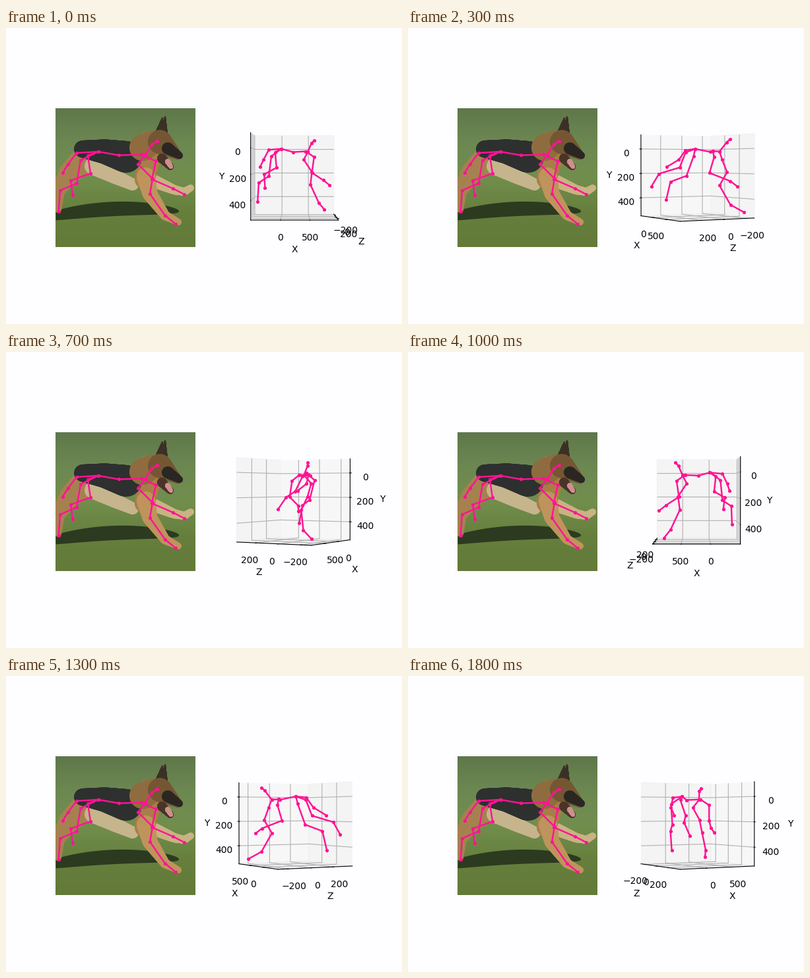
Animation of 600 by 450 pixels, one loop 2000 ms. Source, as a matplotlib script:

```python
import numpy as np
import matplotlib.pyplot as plt
from matplotlib.animation import FuncAnimation
from matplotlib.collections import PatchCollection
from matplotlib.colors import LinearSegmentedColormap
from matplotlib.patches import Circle

W, H, DPI = 600, 450, 100
FRAMES, INTERVAL = 20, 100
VIEWS = 12
PAPER, PINK = "#fefdff", "#ff1493"

# Key joints: position in the photo (u, v) and depth z.
HIP, NECK, WITHERS = (140, 188, 0), (211, 193, -99), (205, 192.4, -46)
CHAINS = [
    [HIP, (171, 193.5, -89), WITHERS, NECK, (221, 177, -147), (229, 172, -162)],
    [HIP, (107, 190, 35), (94, 207, 75), (86, 220, 175)],
    [HIP, (124, 194, 62), (128, 221, 125), (98, 232, 265), (101, 254, 338)],
    [HIP, (113, 201, -31), (107, 236, 25), (82, 247, 135), (79.6, 279, 170)],
    [NECK, (200, 207, -144), (222, 229, -149), (218, 252, -86), (241, 285, -144),
     (257, 298, -240)],
    [WITHERS, (227, 202.5, -20), (221, 230, 12), (253, 244, -120), (270.3, 253, -152)],
]

# Dog parts, back to front: colour, start and end radius, path.
PARTS = [
    ("#c9b283", 10, 5, [(222, 232), (255, 246), (270, 249), (280, 243)]),
    ("#a58150", 21, 5, [(118, 202), (96, 220), (79, 248), (79, 276)]),
    ("#c6b48c", 13, 9, [(132, 210), (165, 226), (192, 238)]),
    ("#a87d48", 18, 15, [(214, 176), (216, 205), (210, 230)]),
    ("#be945c", 14, 5, [(212, 226), (218, 252), (241, 285), (261, 295)]),
    ("#2d302f", 13, 24, [(116, 184), (150, 188), (182, 196)]),
    ("#8f6c3f", 20, 17, [(207, 182), (224, 173)]),
    ("#3a3025", 6, 1, [(232, 160), (237, 137)]),
    ("#3a3025", 6, 1, [(239, 162), (241, 135)]),
    ("#755633", 18, 6, [(233, 173), (261, 194)]),
    ("#4a3328", 7, 5, [(236, 198), (249, 211)]),
    ("#cf8f8d", 4, 3, [(245, 203), (250, 211)]),
    ("#2a2723", 9, 5, [(245, 183), (263, 194)]),
]


def brush(ax, color, r0, r1, path, dabs=80):
    """Tapered round stroke along a path."""
    x, y = np.array(path, float).T
    along = np.r_[0, np.cumsum(np.hypot(np.diff(x), np.diff(y)))]
    t = np.linspace(0, along[-1], dabs)
    centers = zip(np.interp(t, along, x), np.interp(t, along, y))
    circles = [Circle(c, r) for c, r in zip(centers, np.linspace(r0, r1, dabs))]
    ax.add_collection(PatchCollection(circles, fc=color, ec="none"))


def draw_photo(ax):
    left, top, right, bottom = 75, 121.57, 286.36, 332.93
    meadow = LinearSegmentedColormap.from_list(
        "meadow", ["#5f774a", "#6c8852", "#728e4d", "#667f3d", "#637a39"])
    ax.imshow(np.linspace(0, 1, 212)[:, None], cmap=meadow,
              extent=(left, right, bottom, top), aspect="auto")
    x = np.linspace(left, 262, 100)
    middle = 274 + 8 * ((x - 190) / 100) ** 2
    half = 11 * np.sqrt(1 - ((x - 155) / 107) ** 2)
    ax.fill_between(x, middle - half, middle + half, color="#2c3a20", lw=0)
    for part in PARTS:
        brush(ax, *part)
    ax.set(xlim=(left, right), ylim=(bottom, top), aspect="equal")
    ax.axis("off")


def to_world(joints):
    """Photo pixels and depth to the units of the cube."""
    u, v, z = np.array(joints, float).T
    return np.array([6.81 * (u - HIP[0]), 4.6 * (v - HIP[1]), z])


def setup_cube(ax):
    points = np.hstack([to_world(chain) for chain in CHAINS])
    low, high = points.min(axis=1), points.max(axis=1)
    pad = 0.073 * (high - low)
    (x0, y0, z0), (x1, y1, z1) = low - pad, high + pad
    ax.set_box_aspect((1, 1, 1))
    ax.set_xlim(x0, x1, view_margin=0)
    ax.set_ylim(y1, y0, view_margin=0)  # image rows grow downwards
    ax.set_zlim(z0, z1, view_margin=0)
    ax.set(xticks=[0, 500], yticks=[0, 200, 400], zticks=[-200, 0, 200])
    ax.tick_params(pad=3)
    for axis, name in zip((ax.xaxis, ax.yaxis, ax.zaxis), "XYZ"):
        axis.set_label_text(name)
        axis.labelpad = 2.9


fig = plt.figure(figsize=(W / DPI, H / DPI), dpi=DPI, facecolor=PAPER)
photo = fig.add_subplot(121)
cube = fig.add_subplot(122, projection="3d", facecolor=PAPER)
draw_photo(photo)
setup_cube(cube)

STYLE = dict(color=PINK, lw=1.75, marker=".", ms=5.5)
for chain in CHAINS:
    photo.plot(*np.array(chain)[:, :2].T, **STYLE)
    cube.plot(*to_world(chain), **STYLE)


def update(frame):
    view = int((frame + 0.5) * VIEWS / FRAMES)
    azim = 360 * view / VIEWS
    # A tiny nudge keeps the side walls well defined in square-on views.
    nudge = 0.01 * np.cos(np.radians(azim + 45))
    cube.view_init(elev=1, azim=azim + nudge, vertical_axis="y")
    return []


anim = FuncAnimation(fig, update, frames=FRAMES, interval=INTERVAL,
                     init_func=lambda: update(0), repeat=True)
plt.show()
```
